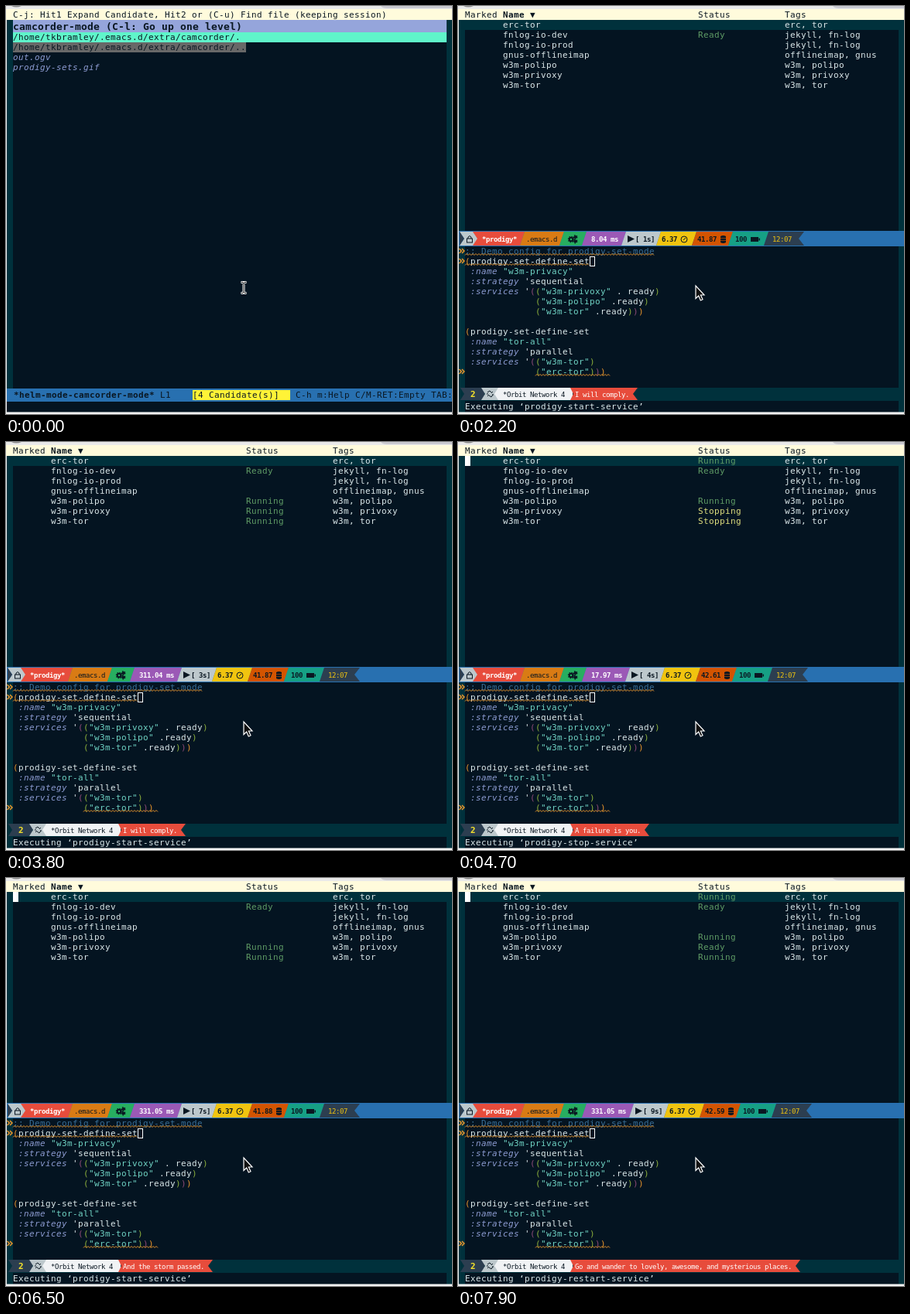
Animation, 576 px wide and 528 px high, one loop 8000 ms. Source, as an HTML page:

```html
<!DOCTYPE html>
<html lang="en">
<head>
<meta charset="utf-8">
<title>Service manager demo</title>
<style>
html, body { margin: 0; width: 100%; height: 100%; overflow: hidden; background: #041421; }
svg { display: block; width: 576px; height: 528px; }
text { font-family: "DejaVu Sans Mono", monospace; white-space: pre; }
.body { font-size: 11px; }
.title { font-size: 13px; font-weight: bold; }
.bar { font-size: 9px; }
.b { font-weight: bold; }
.i { font-style: italic; }
</style>
</head>
<body>
<svg id="stage" viewBox="0 0 576 528" xmlns="http://www.w3.org/2000/svg"></svg>
<script>
const stage = document.getElementById('stage');
const LOOP = 8000, HELM_END = 500;
const C = {
  bg: '#041421', fringe: '#00313c', cream: '#fffbdc', text: '#dce8ea', ink: '#0a1722',
  blue: '#2870b0', lavender: '#95a5db', keyword: '#8d9cd2', string: '#70d3c4', comment: '#386d96',
  orange: '#e5932c', plum: '#8c4a78', lime: '#8aad3c', green: '#5f9c66', yellow: '#dede7e',
  red: '#e74c3c', silver: '#bdc8cc', slate: '#2c3e50', gold: '#f1c40f'
};
const ADVANCE = { body: 7, title: 8, bar: 5 };
const spacing = {};

const esc = s => s.replace(/&/g, '&amp;').replace(/</g, '&lt;');
const rect = (x, y, w, h, fill, more = '') =>
  `<rect x="${x}" y="${y}" width="${w}" height="${h}" fill="${fill}" ${more}/>`;
const path = (d, fill, more = '') => `<path d="${d}" fill="${fill}" ${more}/>`;
const line = (d, color, width = 1) => path(d, 'none', `stroke="${color}" stroke-width="${width}"`);
const text = (x, y, s, fill, cls = '', font = 'body') =>
  `<text x="${x}" y="${y}" fill="${fill}" class="${font} ${cls}" letter-spacing="${spacing[font] || 0}">${esc(s)}</text>`;

// Keeps every font on its whole-pixel terminal cell.
function fitCells() {
  for (const font in ADVANCE) {
    stage.innerHTML = text(0, 20, 'm'.repeat(40), '#000', '', font);
    spacing[font] = ADVANCE[font] - stage.firstChild.getComputedTextLength() / 40;
  }
}

function runs(y, list) {
  let col = 0, out = '';
  for (const [s, color, cls] of list) {
    if (s.trim()) out += text(9 + 7 * col, y, s, color, cls);
    col += s.length;
  }
  return out;
}

function wave(x0, x1, y) {
  let d = `M${x0} ${y}`;
  for (let x = x0 + 2, up = true; x <= x1; x += 2, up = !up) d += `L${x} ${up ? y - 2 : y}`;
  return line(d, C.orange);
}

function frame() {
  return rect(0, 0, 576, 528, C.bg) + rect(0, 0, 576, 5, '#e9e9e9') +
    path('M484 0Q486 3 492 3H576V0Z', '#c9c9cf') + path('M7 0Q13 3 20 0Z', '#8c8c8c') +
    rect(0, 4, 576, 14, C.cream) +
    rect(1, 18, 8, 507, C.fringe) + rect(569, 18, 7, 507, C.fringe);
}
const edges = () => rect(0, 18, 1, 510, '#f4f4f4') + rect(0, 525.5, 576, 2.5, '#f4f4f4');

function helm() {
  const dir = '/home/tkbramley/.emacs.d/extra/camcorder/';
  return frame() +
    text(9, 15, 'C-j: Hit1 Expand Candidate, Hit2 or (C-u) Find file (keeping session)', C.ink) +
    rect(9, 18, 560, 16, C.lavender) +
    text(9, 31, 'camcorder-mode (C-l: Go up one level)', C.ink, '', 'title') +
    rect(9, 34, 560, 13, '#5ff5ca') + text(9, 44, dir + '.', C.ink) +
    rect(9, 47, 301, 13, '#686868') + text(9, 57, dir + '..', C.ink) +
    text(9, 70, 'out.ogv', C.keyword, 'i') + text(9, 83, 'prodigy-sets.gif', C.keyword, 'i') +
    rect(1, 495, 575, 17, C.blue) + rect(1, 512, 575, 14, C.bg) +
    text(10, 507, '*helm-mode-camcorder-mode*', C.ink, 'b') + text(199, 507, 'L1', C.ink) +
    rect(241, 497, 126, 13, '#fff337') + text(241, 507, '[4 Candidate(s)]', C.ink) +
    text(374, 507, 'C-h m:Help C/M-RET:Empty TAB:', C.ink) +
    line('M303.5 357.5H306L307 358.5L308 357.5H310.5M307 358V371M303.5 371.5H306L307 370.5L308 371.5H310.5', '#fff', 3) +
    line('M304 357.5H306L307 358.5L308 357.5H310M307 358V371M304 371.5H306L307 370.5L308 371.5H310', '#111') +
    edges();
}

const services = [
  ['erc-tor', 'erc, tor'], ['fnlog-io-dev', 'jekyll, fn-log'], ['fnlog-io-prod', 'jekyll, fn-log'],
  ['gnus-offlineimap', 'offlineimap, gnus'], ['w3m-polipo', 'w3m, polipo'],
  ['w3m-privoxy', 'w3m, privoxy'], ['w3m-tor', 'w3m, tor']
];
const statusName = { R: 'Running', D: 'Ready', S: 'Stopping' };

// One status letter per service, top to bottom.
const states = [
  { at: 500, status: '.D.....', ms: '8.04', load: '41.76', quip: 'Oh little town of prayers.',
    echo: 'Hey there, space cats! Nelka here, comin’ at you from Lunarpier 6.' },
  { at: 1600, status: '.D.....', ms: '8.04', load: '41.87', quip: 'I will comply.', cmd: 'start' },
  { at: 2700, status: '.D..RRR', ms: '311.04', load: '41.87', quip: 'I will comply.', cmd: 'start' },
  { at: 3900, status: 'RD..RSS', ms: '17.97', load: '42.61', quip: 'A failure is you.', cmd: 'stop', cursor: true },
  { at: 5600, status: '.D...RR', ms: '331.05', load: '41.88', quip: 'And the storm passed.', cmd: 'start', cursor: true },
  { at: 7200, status: 'RD..RDR', ms: '331.05', load: '42.59', cmd: 'restart', cursor: true,
    quip: 'Go and wander to lovely, awesome, and mysterious places.' }
];

function table(s) {
  let out = text(9, 15, 'Marked', C.ink) + text(58, 15, 'Name', C.ink, 'b') + text(93, 15, '▼', C.ink) +
    text(310, 15, 'Status', C.ink) + text(422, 15, 'Tags', C.ink) + rect(9, 18, 560, 13, C.fringe);
  if (s.cursor) out += rect(9, 18, 7, 13, '#fff');
  services.forEach(([name, tags], i) => {
    const y = 28 + 13 * i, k = s.status[i];
    out += text(58, y, name, C.text) + text(422, y, tags, C.text);
    if (k !== '.') out += text(310, y, statusName[k], k === 'S' ? C.yellow : C.green);
  });
  return out;
}

const slant = (a, b, color) => path(`M${a + 3} 292H${b + 3}L${b - 3} 310H${a - 3}Z`, color);
const label = (x, s, color, y = 305) => text(x, y, s, color, 'b', 'bar');

function gear(x, y, r) {
  return `<circle cx="${x}" cy="${y}" r="${r}" fill="none" stroke="${C.ink}" stroke-width="2"/>` +
    `<circle cx="${x}" cy="${y}" r="${r + 1.3}" fill="none" stroke="${C.ink}" stroke-width="1.3" stroke-dasharray="1.4 1.4"/>`;
}

function upperBar(s, seconds) {
  const d = 5 * (s.ms.length - 4);
  const clock = `[${String(seconds || '').padStart(2)}s]`;
  return rect(1, 291, 575, 20, C.blue) +
    path('M2 292H25V310H2L8 301Z', C.silver) + path('M2 292L8 301L2 310Z', C.slate) +
    path('M19 292H86L80 310H19L25 301Z', C.red) +
    slant(83, 134, '#d97b14') + slant(134, 163, '#27ae60') +
    slant(163, 214 + d, '#9b59b6') + slant(214 + d, 259 + d, C.silver) +
    slant(259 + d, 305 + d, C.gold) + slant(305 + d, 352 + d, '#d35400') +
    slant(352 + d, 398 + d, '#16a085') +
    path(`M${401 + d} 292H${447 + d}L${440 + d} 301L${447 + d} 310H${395 + d}Z`, C.slate) +
    rect(11.5, 301, 7, 5, 'none', `stroke="${C.ink}"`) + line('M13 301V299Q15 296 17 299V301', C.ink) +
    label(31, '*prodigy*', '#fff') + text(88, 305, '.emacs.d', C.ink, '', 'bar') +
    gear(146, 302, 2.3) + gear(151.5, 299, 1) + gear(151.5, 304.5, 1) +
    label(172, s.ms + ' ms', '#fff') +
    path(`M${219 + d} 297L${228 + d} 301.5L${219 + d} 306Z`, C.ink) + label(229 + d, clock, C.ink) +
    label(263 + d, '6.37', C.ink) +
    `<circle cx="${292 + d}" cy="302" r="4" fill="none" stroke="${C.ink}"/>` + line(`M${291 + d} 303L${294 + d} 300`, C.ink) +
    label(309 + d, s.load, C.ink) +
    path(`M${339 + d} 298Q${342.5 + d} 296 ${346 + d} 298V306Q${342.5 + d} 308 ${339 + d} 306Z`, C.ink) +
    line(`M${339 + d} 300.5H${346 + d}M${339 + d} 303.5H${346 + d}`, '#d35400', .6) +
    label(358 + d, '100', C.ink) +
    rect(378.5 + d, 299.5, 9, 5, C.ink, `stroke="${C.ink}"`) + rect(388.5 + d, 300.5, 1.5, 3, C.ink) +
    text(406 + d, 305, '12:07', C.gold, '', 'bar');
}

function lowerBar(s) {
  const end = 162 + 5 * s.quip.length;
  return rect(1, 494, 575, 17, C.fringe) +
    path('M3 494H34V510H3L8 502Z', C.slate) +
    path('M30 494H54V510H30L35 502Z', C.silver) +
    path('M52 494H148V510H52L47 502Z', '#f1f3f5') +
    path(`M145 494H${end}L${end - 6} 502L${end} 510H145L149 502Z`, C.red) +
    text(16, 506, '2', '#f5e32b', 'b') +
    line('M38 500L41 498L43 500M40 504L43 506L45 503M38 505L40 503M43 501L45 499M37 502H39M44 503H46', C.ink) +
    text(58, 506, '*Orbit Network 4', C.ink, '', 'bar') + text(151, 506, s.quip, '#fff', '', 'bar');
}

const rowY = n => 321 + 13 * n;
function block(row, name, strategy, items) {
  const paren = (s, depth) => [s, [C.orange, C.plum, C.lime][depth]];
  const key = s => [s, C.keyword, 'i'], plain = s => [s, C.text];
  let out = runs(rowY(row), [paren('(', 0), plain('prodigy-set-define-set')]) +
    runs(rowY(row + 1), [key(' :name '), [`"${name}"`, C.string]]) +
    runs(rowY(row + 2), [key(' :strategy '), plain("'" + strategy)]);
  items.forEach(([service, tail], i) => {
    const lead = i ? [plain(' '.repeat(13))] : [key(' :services '), plain("'"), paren('(', 1)];
    const close = i === items.length - 1 ? [paren(')', 1), paren(')', 0)] : [];
    out += runs(rowY(row + 3 + i), [...lead, paren('(', 2), [`"${service}"`, C.string], plain(tail), paren(')', 2), ...close]);
  });
  return out;
}

function code(checked) {
  let out = text(9, rowY(0), ';; Demo config for prodigy-set-mode', C.comment) +
    block(1, 'w3m-privacy', 'sequential', [['w3m-privoxy', ' . ready'], ['w3m-polipo', ' .ready'], ['w3m-tor', ' .ready']]) +
    block(8, 'tor-all', 'parallel', [['w3m-tor', ''], ['erc-tor', '']]) +
    rect(170.5, 324.5, 6, 12, 'none', 'stroke="#fff"');
  if (checked) {
    out += wave(9, 253, 322.5) + wave(9, 170, 335.5) + wave(100, 197, 478.5);
    for (const row of [0, 1, 12]) {
      const y = rowY(row) - 4;
      out += line(`M1.5 ${y - 3}L4.5 ${y}L1.5 ${y + 3}M5 ${y - 3}L8 ${y}L5 ${y + 3}`, C.orange, 1.5);
    }
  }
  return out;
}

function prodigy(s, seconds, checked) {
  return frame() + table(s) + upperBar(s, seconds) + code(checked) + lowerBar(s) +
    rect(1, 511, 575, 15, C.bg) + rect(1, 511, 8, 15, C.fringe) + rect(569, 511, 7, 15, C.fringe) +
    text(9, 522, s.echo || `Executing ‘prodigy-${s.cmd}-service’`, C.text) +
    path('M307 362V378.5L310.7 375L313.3 381L316 379.8L313.4 374H318Z', '#111', 'stroke="#fff" stroke-width="1.2"') +
    edges();
}

let shown = '';
function update(t) {
  const inHelm = t < HELM_END;
  const s = states.filter(state => state.at <= t).pop();
  const seconds = Math.max(0, Math.floor(1.3 * (t / 1000 - 0.9)));
  const checked = t >= 1500;
  const key = inHelm ? 'helm' : [s.at, seconds, checked].join();
  if (key === shown) return;
  shown = key;
  stage.innerHTML = inHelm ? helm() : prodigy(s, seconds, checked);
}

fitCells();
const start = performance.now();
function tick() {
  update((performance.now() - start) % LOOP);
  requestAnimationFrame(tick);
}
tick();
</script>
</body>
</html>
```
